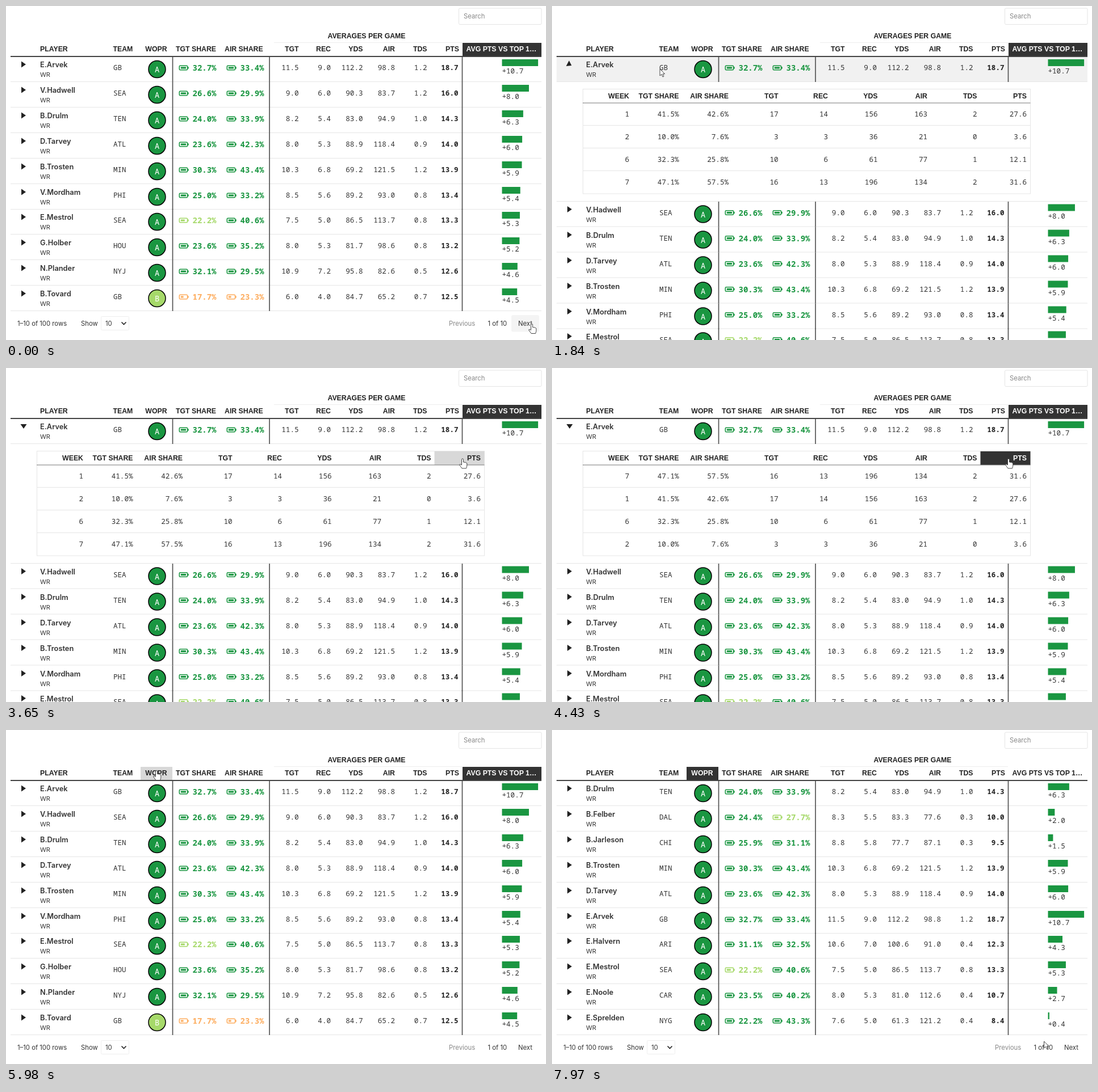
Animation of 951 by 589 pixels, one loop 8 s. Source, as an HTML page:

```html
<!DOCTYPE html>
<html lang="en">
<head>
<meta charset="utf-8">
<title>Player stats table</title>
<style>
  html, body { margin: 0; width: 100%; height: 100%; overflow: hidden; background: #fff; }
  svg { display: block; width: 100vw; height: 100vh; overflow: hidden; }
  text { font: 11.3px Inter, sans-serif; fill: #333; white-space: pre; }
  .head { font: bold 12.3px "Liberation Sans", Arial, sans-serif; fill: #222; }
  .mono { font: 12.6px "Noto Sans Mono", monospace; }
  .bold { font-weight: 700; fill: #222; }
  .share { font: bold 14px "Noto Sans Mono", monospace; }
  .grade { font: 500 13.6px "Noto Sans Mono", monospace; }
  .name { font-weight: 600; font-size: 12.8px; }
  .pos { font-size: 11px; }
  .muted { fill: #888; }
  .white { fill: #fff; }
</style>
</head>
<body>
<svg viewBox="0 0 951 589">
  <g id="table"></g>
  <circle id="ring" r="8" fill="#f5e600" fill-opacity=".7"/>
  <g id="cursor" fill="#fff" stroke="#333" stroke-width=".9" stroke-linejoin="round">
    <path id="arrow" d="M0 0V12L3 9.4L5 14L7 13L5 8.8H8.7Z"/>
    <path id="hand" d="M-1.5 10V1.5a1.5 1.5 0 0 1 3 0V6q5 0 6.3 2V12q0 2-1.3 5H-1Q-4 13-5.5 10.5q1-2 4 .5Z"/>
  </g>
</svg>
<script>
const LOOP = 8000, DARK = '#333', LINE = '#e6e6e6';
const COLORS = ['#d7191c', '#fdae61', '#a6d96a', '#1a9641'];
const STATS = ['TGT', 'REC', 'YDS', 'AIR', 'TDS', 'PTS'];

const oneDecimal = new Intl.NumberFormat('en-US', {
  minimumFractionDigits: 1, maximumFractionDigits: 1, roundingMode: 'halfEven'
});
const fixed = value => oneDecimal.format(value);
const parse = block => block.trim().split('\n').map(row => row.trim().split(' '));
const levelOf = (value, limits) => limits.filter(limit => value >= limit).length;

// A yard scores 0.1 points and a touchdown 6.
const scored = (yards, touchdowns) => yards / 10 + 6 * touchdowns;

// week, target share, air share, TGT, REC, YDS, AIR, TDS
const weeks = parse(`
  1 41.5 42.6 17 14 156 163 2
  2 10.0 7.6 3 3 36 21 0
  6 32.3 25.8 10 6 61 77 1
  7 47.1 57.5 16 13 196 134 2`)
  .map(row => row.map(Number)).map(row => [...row, scored(row[5], row[7])]);

function leader() {
  const [, target, air, ...stats] = weeks[0].map((_, column) =>
    weeks.reduce((sum, row) => sum + row[column], 0) / weeks.length);
  return { name: 'E.Arvek', team: 'GB', position: 'WR', target, air, stats };
}

// name, team, position, target share, air share, yards, points; the other averages follow from these
const players = block => parse(block).map(([name, team, position, ...numbers]) => {
  const [target, air, yards, points] = numbers.map(Number);
  const targets = .34 * target, touchdowns = (points - yards / 10) / 6;
  return { name, team, position, target, air,
    stats: [targets, .66 * targets, yards, 2.8 * air, touchdowns, points] };
});

const byPoints = [leader(), ...players(`
  V.Hadwell SEA WR 26.6 29.9 90.3 16.0
  B.Drulm TEN WR 24.0 33.9 83.0 14.3
  D.Tarvey ATL WR 23.6 42.3 88.9 14.0
  B.Trosten MIN WR 30.3 43.4 69.2 13.9
  V.Mordham PHI WR 25.0 33.2 89.2 13.43
  E.Mestrol SEA WR 22.18 40.6 86.5 13.3
  G.Holber HOU WR 23.6 35.2 81.7 13.2
  N.Plander NYJ WR 32.1 29.5 95.8 12.6
  B.Tovard GB WR 17.7 23.3 84.7 12.5`)];
const lowestGrade = players(`
  V.Drith NO WR 12.1 18.9 41.3 6.1
  V.Wexenford DET TE 16.1 13.4 42.7 8.3
  V.Lornby LA TE 11.7 12.7 37.0 6.7
  L.Kelvan GB TE 12.7 12.5 46.0 10.6
  L.Stralewski TB TE 14.5 17.4 40.0 5.7
  L.Tove ATL WR 15.2 16.0 49.0 5.76
  L.Nulp HOU WR 16.0 13.8 53.1 7.0
  H.Umbelor LV WR 9.4 17.2 48.7 8.9
  P.Feldorn KC WR 8.2 7.1 35.9 5.3
  P.Oreb-Lun IND TE 10.1 12.4 38.8 6.3`);
const highestGrade = [...byPoints.filter(p => /^[BDE]/.test(p.name) && gradeOf(p) == 3), ...players(`
  B.Felber DAL WR 24.4 27.7 83.3 10.0
  B.Jarleson CHI WR 25.9 31.1 77.7 9.5
  E.Halvern ARI WR 31.1 32.5 100.6 12.3
  E.Noole CAR WR 23.5 40.2 81.0 10.7
  E.Sprelden NYG WR 22.24 43.3 61.3 8.4`)].sort((a, b) => a.name < b.name ? -1 : 1);

// Weighted opportunity rating, as a level from 0 (D) to 3 (A)
function gradeOf({ target, air }) {
  return levelOf(1.5 * target + .7 * air, [35, 42, 50]);
}

const text = (x, y, s, cls = '', anchor = 'start', extra = '') =>
  `<text x="${x}" y="${y}" class="${cls}" text-anchor="${anchor}" ${extra}>${s}</text>`;
const rect = (x, y, w, h, fill, extra = '') =>
  `<rect x="${x}" y="${y}" width="${w}" height="${h}" fill="${fill}" ${extra}/>`;
const line = (x1, y1, x2, y2, color = LINE, width = 1) =>
  `<path d="M${x1} ${y1}L${x2} ${y2}" stroke="${color}" stroke-width="${width}"/>`;
const each = (list, draw) => list.map(draw).join('');
const statEnd = i => 515.5 + 56.5 * i;
const weekEnd = i => 136 + 87.5 * i;

function share(x, value, limits) {
  const level = levelOf(value, limits), color = COLORS[level];
  return rect(x + .8, 105.3, 14.2, 7.4, 'none', `rx="1.5" stroke="${color}" stroke-width="1.6"`)
    + rect(x + 15.5, 107.3, 1.7, 3.4, color)
    + rect(x + 3.3, 107.4, 2.6 + 2.2 * level, 3.2, color)
    + text(x + 24, 114, fixed(value) + '%', 'share', 'start', `style="fill:${color}"`);
}

function playerRow(player, top, hovered, angle) {
  const { name, team, position, target, air, stats } = player, grade = gradeOf(player);
  const delta = stats[5] - 8, size = Math.abs(delta) * 5.93, up = delta > 0;
  return `<g transform="translate(0 ${top - 89})">`
    + (hovered ? rect(8, 89, 935, 44.5, '#f1f1f1') : '')
    + line(8, 133.5, 943, 133.5)
    + each([293.5, 464, 803.5], x => line(x, 89, x, 134, '#555', 1.7))
    + `<path d="M27 97.5L35 103L27 108.5Z" fill="#222" transform="rotate(${angle} 31 103)"/>`
    + text(60, 108, name, 'name') + text(60, 125, position, 'pos') + text(189, 113, team, 'mono')
    + `<circle cx="266" cy="111.5" r="15" fill="${COLORS[grade]}" stroke="#000" stroke-width="1.5"/>`
    + text(266, 117, 'DCBA'[grade], 'grade white', 'middle')
    + share(304.5, target, [14, 20, 22.2]) + share(388.5, air, [17, 25, 29])
    + each(stats, (s, i) => text(i < 5 ? statEnd(i) : 796.5, 113, fixed(s), i < 5 ? 'mono' : 'mono bold', 'end'))
    + rect(up ? 873.5 : 873.5 - size, 94, size, 12, COLORS[up ? 3 : 0])
    + text(873.5, 119, (up ? '+' : '') + fixed(delta), 'mono', up ? 'start' : 'end')
    + '</g>';
}

function header({ sort, overGrade }) {
  const gradeHead = sort ? 'head white' : 'head', pointsHead = sort ? 'head' : 'head white';
  return rect(797.5, 4, 145.5, 28.5, '#fff', 'rx="2" stroke="#e4e4e4"') + text(806, 22, 'Search', 'muted')
    + text(635, 57, 'AVERAGES PER GAME', 'head', 'middle') + line(472, 64.5, 803, 64.5, '#eee')
    + (sort || overGrade ? rect(237, 65, 56, 23, sort ? DARK : '#d8d8d8') : '')
    + (sort ? '' : rect(804, 65, 139, 23, DARK))
    + text(60, 80, 'PLAYER', 'head') + text(188.5, 80, 'TEAM', 'head')
    + text(264.5, 80, 'WOPR', gradeHead, 'middle')
    + text(299, 80, 'TGT SHARE', 'head') + text(385, 80, 'AIR SHARE', 'head')
    + each(STATS, (s, i) => text(statEnd(i), 80, s, 'head', 'end'))
    + text(810.5, 80, 'AVG PTS VS TOP 1…', pointsHead);
}

function details({ weekSort, overWeek, overPoints }) {
  const rows = [...weeks].sort((a, b) => weekSort * (a[8] - b[8]));
  const cell = (value, i) => i == 8 ? fixed(value) : i == 1 || i == 2 ? fixed(value) + '%' : value;
  return (overWeek >= 0 ? rect(54.5, 171 + 40 * overWeek, 788, 39.5, '#f0f0f0') : '')
    + rect(54.5, 146.5, 788, 184.5, 'none', `stroke="${LINE}"`)
    + (weekSort || overPoints ? rect(754.5, 147, 88, 24, weekSort ? DARK : '#d8d8d8') : '')
    + line(54, 171, 842.5, 171, '#777')
    + each(['WEEK', 'TGT SHARE', 'AIR SHARE', ...STATS], (s, i) =>
        text(weekEnd(i), 163, s, i == 8 && weekSort ? 'head white' : 'head', 'end'))
    + each(rows, (row, r) => (r ? line(54, 170.5 + 40 * r, 842, 170.5 + 40 * r) : '')
        + each(row, (value, i) => text(weekEnd(i), 195 + 40 * r, cell(value, i), 'mono', 'end')))
    + line(8, 344.5, 943, 344.5);
}

function footer({ overNext }) {
  return (overNext ? rect(890, 545, 49, 29.5, '#f4f4f4', 'rx="3"') : '')
    + text(20, 564, '1–10 of 100 rows') + text(132, 564, 'Show')
    + rect(167.5, 547.5, 49, 24, '#fff', 'rx="2" stroke="#eee"') + text(175, 564, '10')
    + '<path d="M203.5 557.5l4 4l4-4" fill="none" stroke="#222" stroke-width="1.6"/>'
    + text(780, 564, 'Previous', 'muted') + text(848.5, 564, '1 of 10') + text(902, 564, 'Next');
}

const rowTop = (i, open) => 89 + Math.round(44.9 * i) + (open && i ? 210.5 : 0);

function tableMarkup(state) {
  const list = [byPoints, lowestGrade, highestGrade][state.sort];
  return header(state)
    + each(list, (p, i) => playerRow(p, rowTop(i, state.open), state.overRow == i, i ? 0 : state.angle))
    + line(8, 89, 943, 89, '#444', 1.8)
    + (state.open ? details(state) : footer(state));
}

// Pointer moves: start time, end time, x, y; it rests in between
const moves = [
  [0, 0, 926, 560.5], [70, 830, 232, 125], [900, 1130, 173.5, 102], [1130, 1370, 190, 111],
  [1840, 2080, 205, 111], [2330, 2850, 800, 270], [2850, 3030, 784, 234.5], [3180, 3640, 804, 160],
  [4430, 4860, 228, 127], [5510, 5980, 265, 71.5], [7600, 7970, 866.5, 549]
];
const clicks = [1600, 3800, 4200, 4890, 6510, 7370], CLICK_LENGTH = 80;

function pointerAt(t) {
  let [, , x, y] = moves[0];
  for (const [from, to, nextX, nextY] of moves.slice(1)) {
    const p = Math.min(1, Math.max(0, (t - from) / (to - from))), eased = p * p * (3 - 2 * p);
    x += (nextX - x) * eased;
    y += (nextY - y) * eased;
  }
  return [x, y];
}

function easeOutBack(p) {
  const q = Math.min(1, Math.max(0, p)) - 1;
  return 1 + 2.7 * q ** 3 + 1.7 * q * q;
}

function stateAt(t, x, y) {
  const inside = (left, top, right, bottom) => x >= left && x < right && y >= top && y < bottom;
  const open = t >= 1840 && t < 5130;
  const overRow = byPoints.findIndex((_, i) => inside(8, rowTop(i, open), 943, rowTop(i, open) + 45));
  return {
    open, overRow,
    sort: t < 6590 ? 0 : t < 7450 ? 1 : 2,
    weekSort: t < 3880 ? 0 : t < 4280 ? 1 : -1,
    overWeek: open && inside(54, 171, 842, 331) ? Math.floor((y - 171) / 40) : -1,
    overPoints: open && inside(754, 147, 842, 171),
    overGrade: inside(237, 64, 293, 89),
    overNext: !open && inside(890, 545, 939, 575),
    angle: Math.round(90 * (easeOutBack((t - 1820) / 270) - easeOutBack((t - 5110) / 270)))
  };
}

const [table, ring, cursor, arrow, hand] = ['table', 'ring', 'cursor', 'arrow', 'hand'].map(id => document.getElementById(id));
const show = (element, visible) => element.setAttribute('visibility', visible ? 'visible' : 'hidden');
let shownKey = '', start;

function frame(now) {
  start ??= now;
  const t = (now - start) % LOOP, [x, y] = pointerAt(t), state = stateAt(t, x, y), key = JSON.stringify(state);
  if (key != shownKey) table.innerHTML = tableMarkup(state);
  shownKey = key;
  const overLink = state.overNext || state.overGrade || state.overPoints;
  const place = `translate(${x} ${y})`;
  cursor.setAttribute('transform', place);
  ring.setAttribute('transform', place);
  show(arrow, !overLink);
  show(hand, overLink);
  show(ring, clicks.some(click => t >= click && t < click + CLICK_LENGTH));
  requestAnimationFrame(frame);
}
requestAnimationFrame(frame);
</script>
</body>
</html>
```
